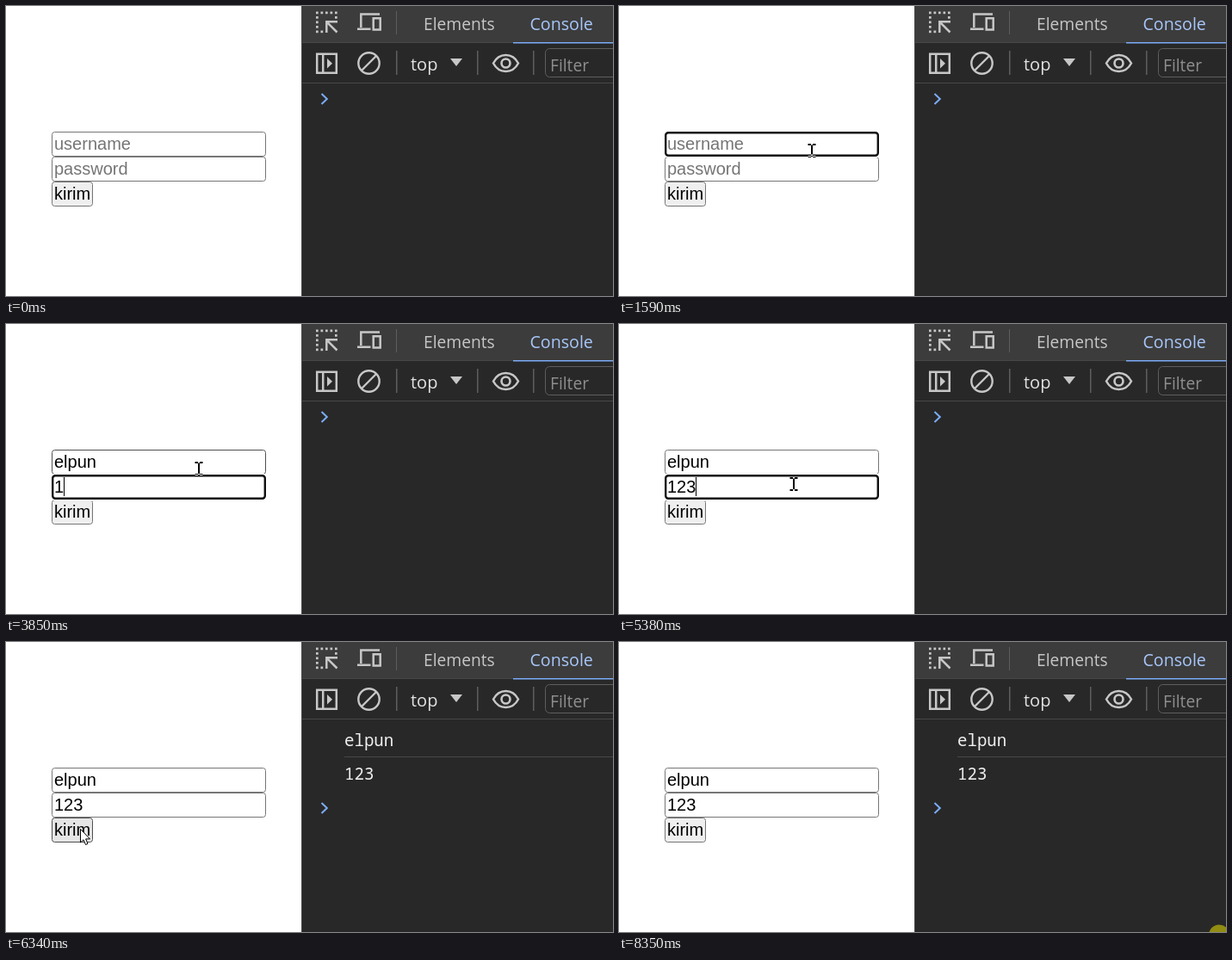
An HTML page with a canvas for the animation above (8.42 s loop, 705 px wide and 337 px high).

```html
<!DOCTYPE html>
<html lang="id">
<head>
<meta charset="utf-8">
<title>Login form and console</title>
<style>
html, body { margin: 0; width: 100%; height: 100%; overflow: hidden; background: #fff; }
canvas { display: block; }
</style>
</head>
<body>
<canvas id="stage" width="705" height="337"></canvas>
<script>
const ctx = document.getElementById('stage').getContext('2d');
const LOOP = 8420;
const ARIAL = '20px Arial, "Liberation Sans", sans-serif';
const MONO = '19.1px "Noto Sans Mono", monospace';
const ui = size => `${size}px "Open Sans", sans-serif`;

const USER = 'elpun', PASS = '123';
const userKeys = [2070, 2190, 2330, 2530, 2660];
const passKeys = [3850, 4050, 4250];
const FOCUS_USER = 1150, FOCUS_PASS = 2990, PRESS = 6210, RELEASE = 6340;
const caretOff = [[1590, 2070], [3520, 3850], [4780, 5240], [5720, 6210]];

// Pointer: time, x, y
const path = [
  [390, 603, 322], [600, 430, 262], [800, 280, 194], [940, 223, 169], [1005, 220, 166],
  [1260, 220, 166], [1330, 224, 167], [5171, 224, 167], [5240, 220, 170], [5378, 203, 185],
  [5520, 150, 206], [5700, 100, 218], [5855, 86, 217], [7186, 86, 217], [7260, 92, 219],
  [7500, 230, 250], [7800, 540, 305], [8079, 693, 318], [8150, 692, 328]
];
// Recorder sampling: start, interval
const sampling = [[390, 68.8], [5240, 68.8], [7260, 74.5]];

function text(str, x, y, font, color) {
  ctx.font = font;
  ctx.fillStyle = color;
  ctx.fillText(str, x, y);
}

function rect(x, y, w, h, color) {
  ctx.fillStyle = color;
  ctx.fillRect(x, y, w, h);
}

function box(x, y, w, h, r, stroke, fill, width = 1) {
  ctx.beginPath();
  ctx.roundRect(x, y, w, h, r);
  if (fill) { ctx.fillStyle = fill; ctx.fill(); }
  ctx.strokeStyle = stroke;
  ctx.lineWidth = width;
  ctx.stroke();
}

function stroke(d, color, width) {
  ctx.strokeStyle = color;
  ctx.lineWidth = width;
  ctx.stroke(new Path2D(d));
}

function fill(d, color) {
  ctx.fillStyle = color;
  ctx.fill(new Path2D(d));
}

function pointerAt(t) {
  if (t < 390 || t >= 8280) return null;
  const [start, step] = sampling.findLast(s => s[0] <= t);
  const q = start + Math.floor((t - start) / step) * step;
  const i = path.findIndex(p => p[0] > q);
  if (i < 0) return { x: 692, y: 328 };
  const a = path[i - 1], b = path[i], k = (q - a[0]) / (b[0] - a[0]);
  return { x: Math.round(a[1] + (b[1] - a[1]) * k), y: Math.round(a[2] + (b[2] - a[2]) * k) };
}

function drawField(y, value, hint, hover) {
  box(53.5, y + .5, 248, 28, 3, hover ? '#4f4f4f' : '#767676', '#fff');
  text(value || hint, 56, y + 21, ARIAL, value ? '#000' : '#757575');
}

function drawFocus(y, value, caret) {
  box(53.5, y + .5, 248, 28, 4, '#fff', null, 4);
  box(54.2, y + 1.2, 246.6, 26.6, 3, '#101010', null, 2.4);
  ctx.font = ARIAL;
  if (caret) rect(Math.floor(56 + ctx.measureText(value).width), y + 3, 1, 22, '#000');
}

function drawForm(t, p) {
  const inside = (y, w) => p && p.x >= 53 && p.x < 53 + w && p.y >= y && p.y < y + 29;
  const typed = (str, keys) => str.slice(0, keys.filter(k => k <= t).length);
  const user = typed(USER, userKeys), pass = typed(PASS, passKeys);
  const overUser = inside(146, 249), overPass = inside(175, 249), overButton = inside(204, 48);
  const active = t >= PRESS && t < RELEASE;

  drawField(146, user, 'username', overUser);
  drawField(175, pass, 'password', overPass);
  box(53.5, 204.5, 47, 28, 3, active ? '#8d8d8d' : overButton ? '#4f4f4f' : '#767676',
    active ? '#f5f5f5' : overButton ? '#e5e5e5' : '#efefef');
  text('kirim', 56, 225, ARIAL, '#000');

  const caret = !caretOff.some(([a, b]) => t >= a && t < b);
  if (t >= FOCUS_PASS && t < PRESS) drawFocus(175, pass, caret);
  else if (t >= FOCUS_USER && t < FOCUS_PASS) drawFocus(146, user, caret);
  return overUser || overPass;
}

function drawTools() {
  const icon = '#c7c7c7', line = '#5e5e5e';
  rect(343, 0, 362, 337, '#282828');
  rect(343, 0, 362, 42, '#3c3c3c');
  rect(343, 42, 362, 1, '#474747');
  rect(343, 89, 362, 1, '#474747');
  rect(343, 0, 1, 337, '#474747');
  rect(589, 42, 116, 1.5, '#7cacf8');
  rect(453, 6, 1, 27, line);
  for (const x of [453, 547, 612]) rect(x, 52, 1.5, 28, line);

  // Inspect
  for (let i = 0; i < 5; i++) {
    rect(360 + i * 5.5, 6.5, 2.7, 2.7, icon);
    if (i) rect(360, 6.5 + i * 5.5, 2.7, 2.7, icon);
  }
  rect(365.5, 28.5, 2.7, 2.7, icon);
  rect(382, 12, 2.7, 2.7, icon);
  stroke('M372.3 31V18.3H385M372.3 18.3L384.5 30.5', icon, 2.5);

  // Devices
  stroke('M434 9.5H412.3V25M408 26.7H423.5M426.7 14.2H434.7V27.5H426.7Z', icon, 2.5);

  // Sidebar, clear, context arrow, eye
  stroke('M361.2 55.7H383.8V77.8H361.2ZM368.2 56V78', icon, 2.5);
  fill('M373 61L379 66.8L373 72.5Z', icon);
  stroke('M409.3 66.5a12.2 12.2 0 1 0 24.4 0a12.2 12.2 0 1 0 -24.4 0M413 75L430 58', icon, 2.4);
  fill('M516 61H530L523 70Z', icon);
  stroke('M566 66.5Q571 57 580.5 57T595 66.5Q590 76 580.5 76T566 66.5Z', icon, 2.5);
  stroke('M575.5 66.5a5 5 0 1 0 10 0a5 5 0 1 0 -10 0', icon, 2.6);

  box(626.5, 49.5, 90, 33, 5, line);
  text('Elements', 485, 28, ui(19.2), icon);
  text('Console', 608.5, 28, ui(19.6), '#a8c7fa');
  text('top', 470, 75, ui(20), '#e3e3e3');
  text('Filter', 632, 76, ui(19.2), '#8f8f8f');
}

function drawConsole(t) {
  const logged = t >= RELEASE;
  if (logged) {
    text(USER, 393, 121, MONO, '#f0f0f0');
    rect(393, 133, 312, 1, '#474747');
    text(PASS, 393, 160, MONO, '#f0f0f0');
  }
  stroke(`M366.5 ${logged ? 187 : 102}l6.3 6l-6.3 6`, '#7cacf8', 2);
}

function drawPointer({ x, y }, beam) {
  ctx.save();
  ctx.translate(x, y);
  if (beam) {
    ctx.globalCompositeOperation = 'difference';
    stroke('M-4.5 -6H-1M1 -6H4.5M0 -5.5V7M-4.5 8H-1M1 8H4.5', '#fff', 2);
  } else {
    const arrow = 'M.5 .5V16L4 12.8L6.5 18.5L9 17.4L6.6 11.9H11.5Z';
    fill(arrow, '#fff');
    stroke(arrow, '#000', 1);
  }
  ctx.restore();
}

function draw() {
  const t = performance.now() % LOOP;
  const pointer = pointerAt(t);
  rect(0, 0, 705, 337, '#fff');
  const beam = drawForm(t, pointer);
  drawTools();
  drawConsole(t);
  if (pointer) drawPointer(pointer, beam);
  if (t >= 8350) fill('M685 340.5a12 12 0 1 0 24 0a12 12 0 1 0 -24 0', '#918c12');
  requestAnimationFrame(draw);
}
draw();
</script>
</body>
</html>
```
